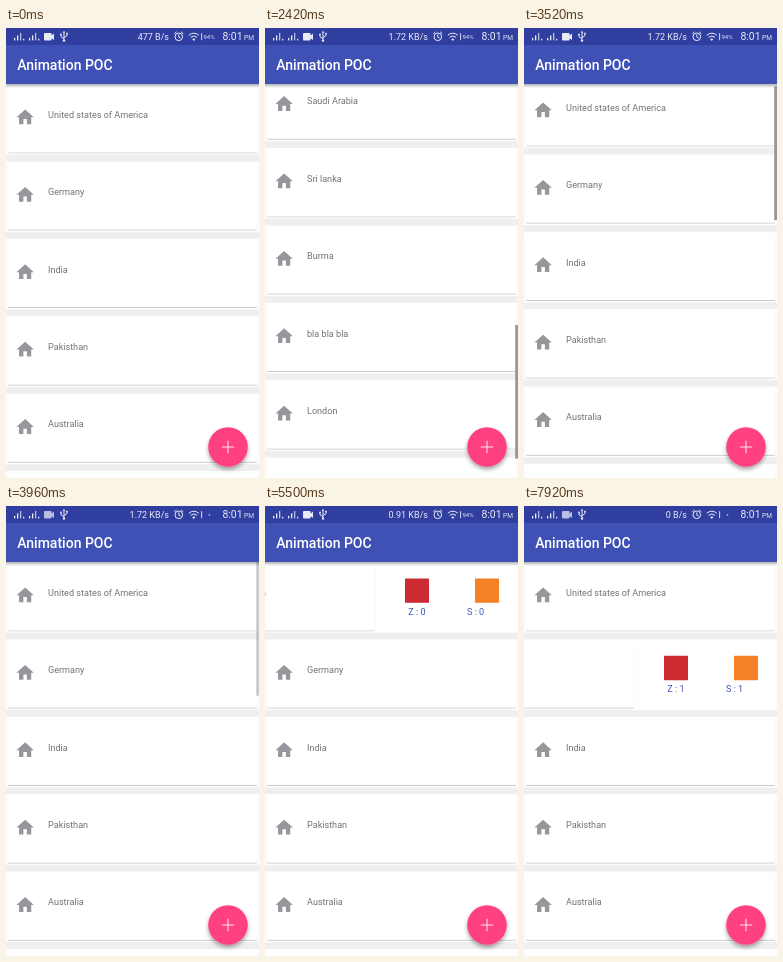
Animation, 253 px wide and 450 px high, one loop 8 s. Source, as an HTML page:

```html
<!DOCTYPE html>
<html lang="en">
<head>
<meta charset="utf-8">
<title>Animation POC</title>
<style>
  html, body { margin: 0; width: 100%; height: 100%; overflow: hidden; background: #efefef; }
  svg { display: block; width: 100%; height: 100%; font-family: Roboto, sans-serif; }
  .label { font-size: 9.1px; fill: #737378; }
  .count { font-size: 9.1px; fill: #3f51b5; }
  .status { fill: #e8eaf6; }
  .line { fill: none; stroke: #e8eaf6; stroke-width: 1; }
</style>
</head>
<body>
<svg viewBox="0 0 253 450">
  <defs>
    <filter id="cardShadow" x="-5%" y="-10%" width="110%" height="125%">
      <feDropShadow dx="0" dy=".7" stdDeviation=".7" flood-opacity=".3"/>
    </filter>
    <filter id="fabShadow" x="-30%" y="-30%" width="160%" height="170%">
      <feDropShadow dx="0" dy="2.6" stdDeviation="2.2" flood-opacity=".36"/>
    </filter>
    <linearGradient id="barShadow" x1="0" y1="0" x2="0" y2="1">
      <stop offset="0" stop-color="#000" stop-opacity=".3"/>
      <stop offset="1" stop-color="#000" stop-opacity="0"/>
    </linearGradient>
  </defs>

  <rect width="253" height="450" fill="#efefef"/>
  <g id="list"></g>
  <rect id="thumb" x="250.2" width="2.8" fill="#777" fill-opacity=".75"/>

  <rect y="56" width="253" height="4" fill="url(#barShadow)"/>
  <rect y="17" width="253" height="39" fill="#3f51b5"/>
  <rect width="253" height="17" fill="#303f9f"/>
  <text x="11.3" y="42" font-size="14" font-weight="500" fill="#fff">Animation POC</text>

  <g id="signals" class="status"></g>
  <path id="camera" class="status" d="M39 5h5.6q1 0 1 1v1.4l2.4-1.8v6.4l-2.4-1.8v1.4q0 1-1 1h-5.6q-1 0-1-1v-5.6q0-1 1-1z"/>
  <g class="line" stroke-width=".9">
    <path d="M58 4.5v8M58 10.8l-3-2v-2M58 9.6l3-2v-2"/>
    <path class="status" d="M58 2.8l1.3 2h-2.6zM60.2 4.7h1.6v1.6h-1.6z" stroke="none"/>
    <circle class="status" cx="58" cy="12.6" r="1.2" stroke="none"/>
    <circle class="status" cx="55" cy="6.4" r=".9" stroke="none"/>
  </g>
  <text id="speed" class="status" x="163" y="12" font-size="9" text-anchor="end"></text>
  <g class="line">
    <circle cx="172.8" cy="8.8" r="3.8"/>
    <path d="M172.8 6.4v2.7l1.8 1M168.3 5.8l2.2-2M177.3 5.8l-2.2-2"/>
    <path d="M182.8 7.2q5-4 10 0M184.6 9.3q3.2-2.6 6.4 0"/>
    <path class="status" d="M186.2 11q1.6-1.2 3.2 0l-1.6 1.9z" stroke="none"/>
    <path d="M195.6 5.2v7" stroke-width=".9"/>
  </g>
  <text id="percent" class="status" x="197.4" y="11" font-size="6">94%</text>
  <circle id="charging" class="status" cx="203.5" cy="8.8" r=".9"/>
  <text class="status" x="216.5" y="12.4" font-size="10.4">8:01<tspan x="238" font-size="6.6">PM</tspan></text>

  <circle cx="222" cy="419" r="19.8" fill="#ff4081" filter="url(#fabShadow)"/>
  <path d="M222 412.8v12.4M215.8 419h12.4" stroke="#ffe3ec" stroke-width="1.1"/>
</svg>
<script>
const LOOP = 8000, STEP = 220;
const TOP = 56, PITCH = 77.4, ROW = 70.6, VIEW = 450 - TOP, OPEN = 141;
const places = ["United states of America", "Germany", "India", "Pakisthan", "Australia",
  "Antartica", "China", "Japan", "Nepal", "Saudi Arabia", "Sri lanka", "Burma",
  "bla bla bla", "London", "Paris"];
const TOTAL = places.length * PITCH;

const scrollKeys = [[1100, 0], [1320, 12], [1540, 58.5], [1760, 210], [2200, 595], [2420, 710],
  [2640, TOTAL - VIEW], [2860, 640], [3080, 390], [3300, 120], [3520, 7], [3740, 0]];
const swipeKeys = [
  [[4180, 0], [4400, 30], [4620, 88.5], [4840, OPEN], [5720, OPEN], [5940, 60], [6160, 0]],
  [[6160, 0], [6380, 75], [6600, OPEN]]
];
const speeds = [[0, "477 B/s"], [1100, "1.72 KB/s"], [4180, "0.91 KB/s"], [7260, "0 B/s"]];

const byId = id => document.getElementById(id);

function make(parent, tag, attrs, text = "") {
  const node = document.createElementNS("http://www.w3.org/2000/svg", tag);
  for (const key in attrs) node.setAttribute(key, attrs[key]);
  node.textContent = text;
  return parent.appendChild(node);
}

// Linear interpolation over [time, value] pairs, held at both ends
function sample(keys, t) {
  const next = keys.findIndex(key => key[0] > t);
  if (next === 0) return keys[0][1];
  if (next < 0) return keys[keys.length - 1][1];
  const [t0, v0] = keys[next - 1], [t1, v1] = keys[next];
  return v0 + (v1 - v0) * (t - t0) / (t1 - t0);
}

function makeRow(name, index) {
  const row = make(byId("list"), "g", { transform: `translate(0 ${TOP + index * PITCH})` });
  make(row, "rect", { width: 253, height: ROW, fill: "#fff" });
  const parts = {};
  if (index < swipeKeys.length) {
    make(row, "rect", { x: 140, y: 16.4, width: 24, height: 24.4, rx: .6, fill: "#cb2a30" });
    make(row, "rect", { x: 210, y: 16.4, width: 24, height: 24.4, rx: .6, fill: "#f58025" });
    parts.z = make(row, "text", { class: "count", x: 143.3, y: 52.6 });
    parts.s = make(row, "text", { class: "count", x: 202, y: 52.6 });
  }
  parts.card = make(row, "g", {});
  make(parts.card, "rect", { x: 1.8, y: 1.6, width: 249.4, height: 66.6, rx: 1.2, fill: "#fff", filter: "url(#cardShadow)" });
  make(parts.card, "path", {
    d: "M10 20v-6h4v6h5v-8h3L12 3 2 12h3v8z", fill: "#96979d",
    transform: "translate(8.7 22.9) scale(.87)"
  });
  make(parts.card, "text", { class: "label", x: 42, y: 33.9 }, name);
  return parts;
}

const rows = places.map(makeRow);

for (const x of [8, 23]) {
  [2.5, 5, 7.5, 1.6].forEach((height, i) =>
    make(byId("signals"), "rect", { x: x + i * 3, y: 12.4 - height, width: 1.3, height, opacity: i === 2 ? .75 : 1 }));
}

function draw(t) {
  const scroll = sample(scrollKeys, t);
  byId("list").setAttribute("transform", `translate(0 ${-scroll})`);

  const thumb = byId("thumb");
  thumb.setAttribute("y", TOP + scroll * VIEW / TOTAL);
  thumb.setAttribute("height", VIEW * VIEW / TOTAL);
  thumb.setAttribute("opacity", t < 1320 ? 0 : sample([[3740, 1], [4180, 0]], t));

  swipeKeys.forEach((keys, i) => {
    const { card, z, s } = rows[i];
    card.setAttribute("transform", `translate(${-sample(keys, t)} 0)`);
    z.textContent = `Z : ${i === 1 && t >= 7040 ? 1 : 0}`;
    s.textContent = `S : ${i === 1 && t >= 7480 ? 1 : 0}`;
  });

  byId("speed").textContent = speeds.filter(([start]) => start <= t).pop()[1];
  const steady = t % 1000 < 530;
  byId("percent").setAttribute("opacity", steady ? 1 : 0);
  byId("charging").setAttribute("opacity", steady ? 0 : .7);
  byId("camera").setAttribute("opacity", steady ? 1 : .75);
}

const start = performance.now();
function tick() {
  const t = (performance.now() - start) % LOOP;
  draw(Math.floor(t / STEP) * STEP);
  requestAnimationFrame(tick);
}
tick();
</script>
</body>
</html>
```
